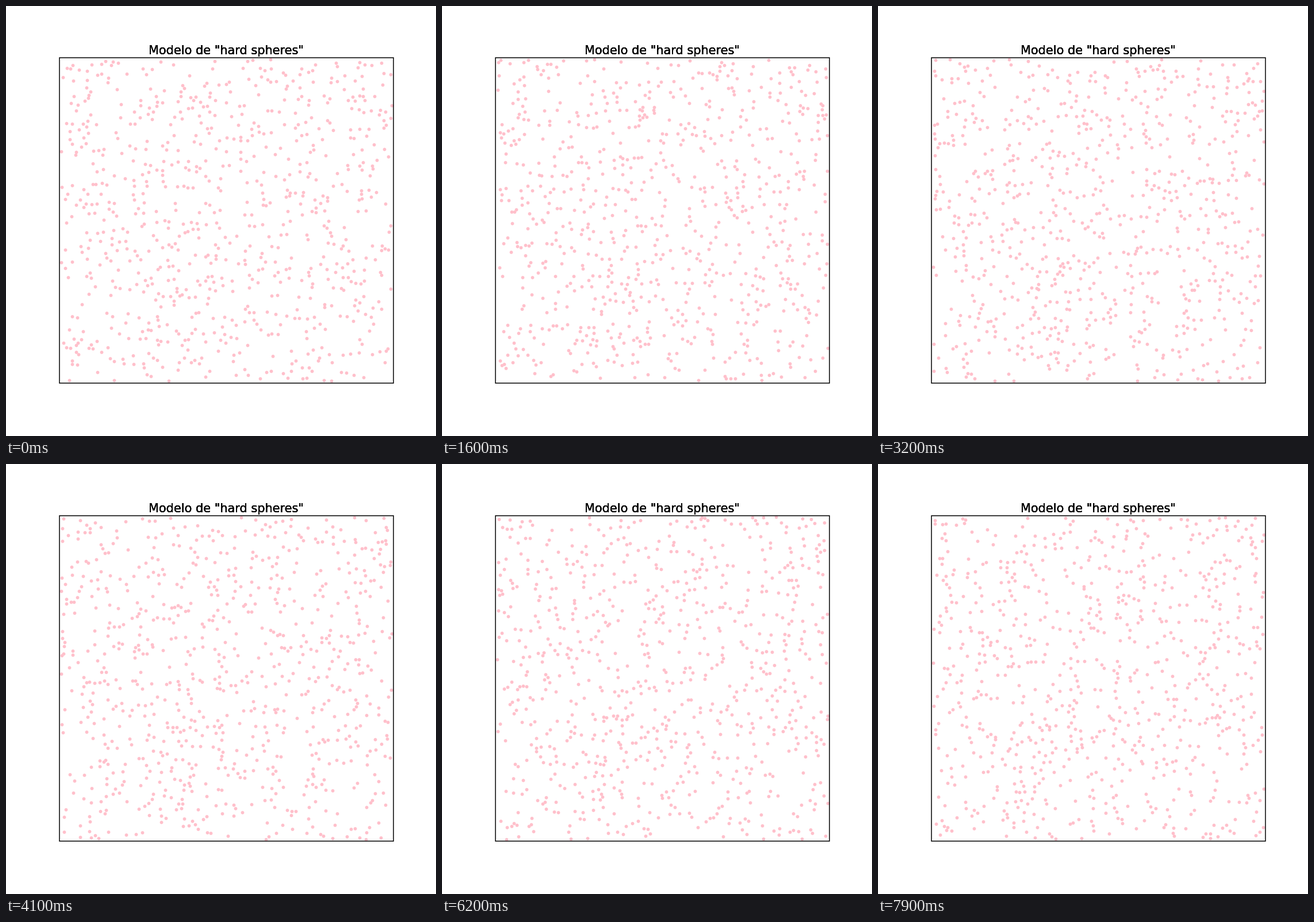
These frames come from a looping animation (748x748 px, 8000 ms). A matplotlib script:

```python
import numpy as np
import matplotlib.pyplot as plt
from matplotlib.animation import FuncAnimation
from matplotlib.patches import Rectangle

SIZE, DPI = 748, 64
PX = 72 / DPI  # points per pixel
LEFT, RIGHT, TOP, BOTTOM = 93.5, 674.0, 89.8, 655.5
COUNT, DIAMETER, SPEED = 800, 5.0, 0.9
FRAMES, INTERVAL, SUBSTEPS = 80, 100, 2

rng = np.random.default_rng(11)
low = np.array([LEFT, TOP]) + DIAMETER / 2
high = np.array([RIGHT, BOTTOM]) - DIAMETER / 2


def scatter_spheres():
    """Random positions without overlaps."""
    pos = np.empty((0, 2))
    while len(pos) < COUNT:
        p = rng.uniform(low, high)
        if np.all(np.hypot(*(pos - p).T) > DIAMETER):
            pos = np.vstack([pos, p])
    return pos


def bounce_walls(pos, vel):
    vel[:] = np.where(pos < low, np.abs(vel), vel)
    vel[:] = np.where(pos > high, -np.abs(vel), vel)
    np.clip(pos, low, high, out=pos)


def collide(pos, vel):
    """Elastic collisions between equal masses."""
    gap = pos[:, None] - pos[None]
    near = np.triu((gap ** 2).sum(axis=2) < DIAMETER ** 2, 1)
    for i, j in np.argwhere(near):
        d = pos[i] - pos[j]
        normal = d / max(np.hypot(*d), 1e-9)
        approach = (vel[i] - vel[j]) @ normal
        if approach < 0:
            vel[i] -= approach * normal
            vel[j] += approach * normal


def simulate():
    pos = scatter_spheres()
    vel = rng.normal(0, SPEED, (COUNT, 2))
    path = [pos.copy()]
    for _ in range(FRAMES - 1):
        for _ in range(SUBSTEPS):
            pos += vel / SUBSTEPS
            bounce_walls(pos, vel)
            collide(pos, vel)
        path.append(pos.copy())
    return path


path = simulate()

fig = plt.figure(figsize=(SIZE / DPI, SIZE / DPI), dpi=DPI, facecolor="white")
ax = fig.add_axes([0, 0, 1, 1])
ax.set(xlim=(0, SIZE), ylim=(SIZE, 0))
ax.axis("off")

dots, = ax.plot([], [], "o", color="pink", ms=5.8 * PX, mew=0)
ax.add_patch(Rectangle((LEFT, TOP), RIGHT - LEFT, BOTTOM - TOP, fill=False,
                       ec="black", lw=1.5 * PX, zorder=3))
# Stacked copies give the title its heavier edges.
for _ in range(4):
    ax.text(383.5, 83.5, 'Modelo de "hard spheres"', family="DejaVu Sans",
            size=20.83 * PX, ha="center", va="baseline", color="black")


def draw(frame):
    dots.set_data(*path[frame].T)
    return dots,


anim = FuncAnimation(fig, draw, frames=FRAMES, interval=INTERVAL,
                     repeat=True, repeat_delay=0)
plt.show()
```
